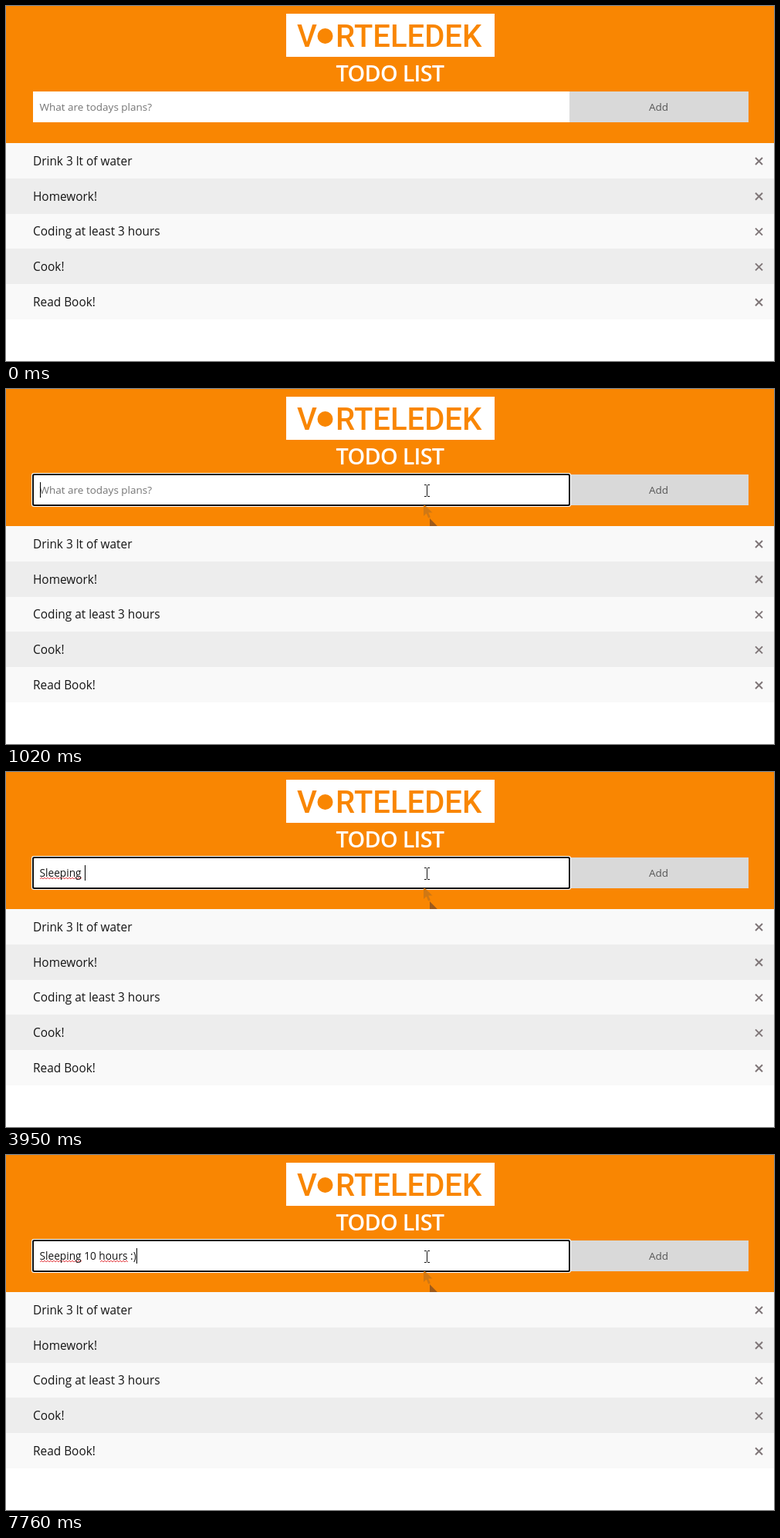
An HTML page for the animation above (8000 ms loop, 995 by 461 pixels).

```html
<!DOCTYPE html>
<html lang="en">
<head>
<meta charset="utf-8">
<title>Todo list</title>
<style>
  html, body { margin: 0; width: 100%; height: 100%; overflow: hidden; background: #fff; }
  svg { display: block; width: 995px; height: 461px; font-family: "Open Sans", "Noto Sans", sans-serif; }
  .logo { font: 500 40px Roboto, sans-serif; fill: #f98602; }
  .title { font-size: 28.8px; font-weight: 600; letter-spacing: -.7px; fill: #fff; }
  .item { font-size: 15.4px; fill: #151515; }
  .hint { font-size: 13.5px; fill: #757575; }
  .add { fill: #555; }
  .typed { font-size: 13.7px; fill: #151515; white-space: pre; }
  .wave { fill: none; stroke: #e5484d; }
  .cross { fill: none; stroke: #7f7678; stroke-width: 2; }
</style>
</head>
<body>
<svg viewBox="0 0 995 461">
  <defs>
    <path id="arrow" d="M0 0V16L3.7 12.6 6.2 18.6 8.8 17.5 6.3 11.6H11.4Z"/>
    <clipPath id="below"><rect x="530" y="151" width="40" height="27"/></clipPath>
  </defs>
  <rect width="995" height="178" fill="#f98602"/>
  <rect x="363" y="10" width="270" height="56" fill="#fff"/>
  <g class="logo">
    <text x="377" y="53">V</text>
    <circle cx="413.5" cy="39" r="10"/>
    <text x="427" y="53">RTELEDEK</text>
  </g>
  <text class="title" x="497.5" y="98" text-anchor="middle">TODO LIST</text>
  <rect x="35" y="111" width="695" height="40" fill="#fff"/>
  <rect x="730" y="111" width="232" height="40" fill="#d9d9d9"/>
  <text class="hint add" x="845.5" y="136" text-anchor="middle">Add</text>
  <g id="focus">
    <rect x="33" y="109" width="699" height="44" rx="3" fill="#fff"/>
    <rect x="34" y="110" width="697" height="42" rx="2.5" fill="#101010"/>
    <rect x="36" y="112" width="693" height="38" rx="1" fill="#fff"/>
  </g>
  <text id="hint" class="hint" x="43.5" y="136">What are todays plans?</text>
  <path id="wave1" class="wave"/>
  <path id="wave2" class="wave"/>
  <text id="typed" class="typed" x="43.5" y="136"></text>
  <rect id="caret" y="121" width="1" height="20" fill="#000"/>
  <g id="rows"></g>
  <g clip-path="url(#below)">
    <use id="trail1" href="#arrow" x="549" y="168" fill="#9e5a1a"/>
    <use id="trail2" href="#arrow" x="541" y="149" fill="#d07814"/>
  </g>
  <use id="pointer" href="#arrow" fill="#fff" stroke="#111"/>
  <path id="beam" d="M-3.5 -7.5H-1L0 -6.5 1 -7.5H3.5M0 -6.5V6.5M-3.5 7.5H-1L0 6.5 1 7.5H3.5" fill="none" stroke="#111"/>
</svg>
<script>
const LOOP = 8000, TICK = 67.8, BLINK = 530;
const ENTER = 70, IN_FIELD = 535, FOCUS = 1020;
const $ = id => document.getElementById(id);
const show = (id, on) => $(id).style.display = on ? "" : "none";
const rowEdge = i => Math.round(178 + 45.8 * i);

// key points of the pointer: time, x, y
const path = [[70, 612, 371], [270, 551, 174], [470, 541, 149], [680, 545, 132]];

const bursts = [
  { text: "Sleeping ", from: 2160, gap: 217.5 },
  { text: "10 ", from: 4430, gap: 165 },
  { text: "hours", from: 5360, gap: 165 },
  { text: " :", from: 6970, gap: 200 },
  { text: ")", from: 7760, gap: 0 },
];
const keys = bursts.flatMap(({ text, from, gap }) =>
  [...text].map((letter, i) => ({ letter, time: from + i * gap })));

function add(name, attrs, text = "") {
  const el = document.createElementNS("http://www.w3.org/2000/svg", name);
  for (const key in attrs) el.setAttribute(key, attrs[key]);
  el.textContent = text;
  return $("rows").appendChild(el);
}

function wave(id, from, to) {
  let d = `M${from} 139`;
  for (let x = from + 2, up = true; x <= to; x += 2, up = !up) d += `L${x} ${up ? 137 : 139}`;
  $(id).setAttribute("d", d);
}

const items = ["Drink 3 lt of water", "Homework!", "Coding at least 3 hours", "Cook!", "Read Book!"];
const rows = items.map((label, i) => {
  const top = rowEdge(i), mid = 201.2 + 45.8 * i;
  const back = add("rect", { x: 0, y: top, width: 995, height: rowEdge(i + 1) - top });
  add("text", { class: "item", x: 35, y: Math.round(mid + 5.5) }, label);
  add("path", { class: "cross", d: `M971 ${mid - 4.2}l9 9m0 -9l-9 9` });
  return back;
});
wave("wave1", 44, 98);
wave("wave2", 122, 158);

// The pointer moves in ticks along straight legs between the key points.
function pointerAt(t) {
  const time = ENTER + Math.floor((t - ENTER) / TICK + .05) * TICK;
  const next = path.findIndex(p => p[0] > time);
  if (next < 0) return path.at(-1).slice(1);
  const [t0, x0, y0] = path[Math.max(next - 1, 0)], [t1, x1, y1] = path[Math.max(next, 1)];
  const k = Math.max(0, (time - t0) / (t1 - t0));
  return [Math.round(x0 + k * (x1 - x0)), Math.round(y0 + k * (y1 - y0))];
}

function drawPointer(t) {
  const [x, y] = pointerAt(t);
  const hoverY = y + 20; // the row colour lags behind the pointer
  rows.forEach((back, i) => {
    const hover = t >= ENTER && hoverY >= rowEdge(i) && hoverY < rowEdge(i + 1);
    back.setAttribute("fill", hover ? "#e0e0e0" : i % 2 ? "#ededed" : "#f9f9f9");
  });
  $("pointer").setAttribute("transform", `translate(${x + .5} ${y + .5})`);
  $("beam").setAttribute("transform", `translate(${x + .5} ${y})`);
  show("pointer", t >= ENTER && t < IN_FIELD);
  show("beam", t >= IN_FIELD);
  show("trail1", t >= IN_FIELD - 2 * TICK);
  show("trail2", t >= IN_FIELD);
}

function drawField(t) {
  const typed = keys.filter(key => key.time <= t);
  const count = typed.length;
  const lastInput = count ? typed[count - 1].time : FOCUS;
  $("typed").textContent = typed.map(key => key.letter).join("");
  $("caret").setAttribute("x", Math.round(43.9 + $("typed").getComputedTextLength()));
  show("caret", t >= FOCUS && (t - lastInput) % (2 * BLINK) < BLINK);
  show("focus", t >= FOCUS);
  show("hint", !count);
  show("wave1", count >= 9);
  show("wave2", count >= 18);
}

const start = performance.now();
function frame() {
  const t = (performance.now() - start) % LOOP;
  drawPointer(t);
  drawField(t);
  requestAnimationFrame(frame);
}
frame();
</script>
</body>
</html>
```
